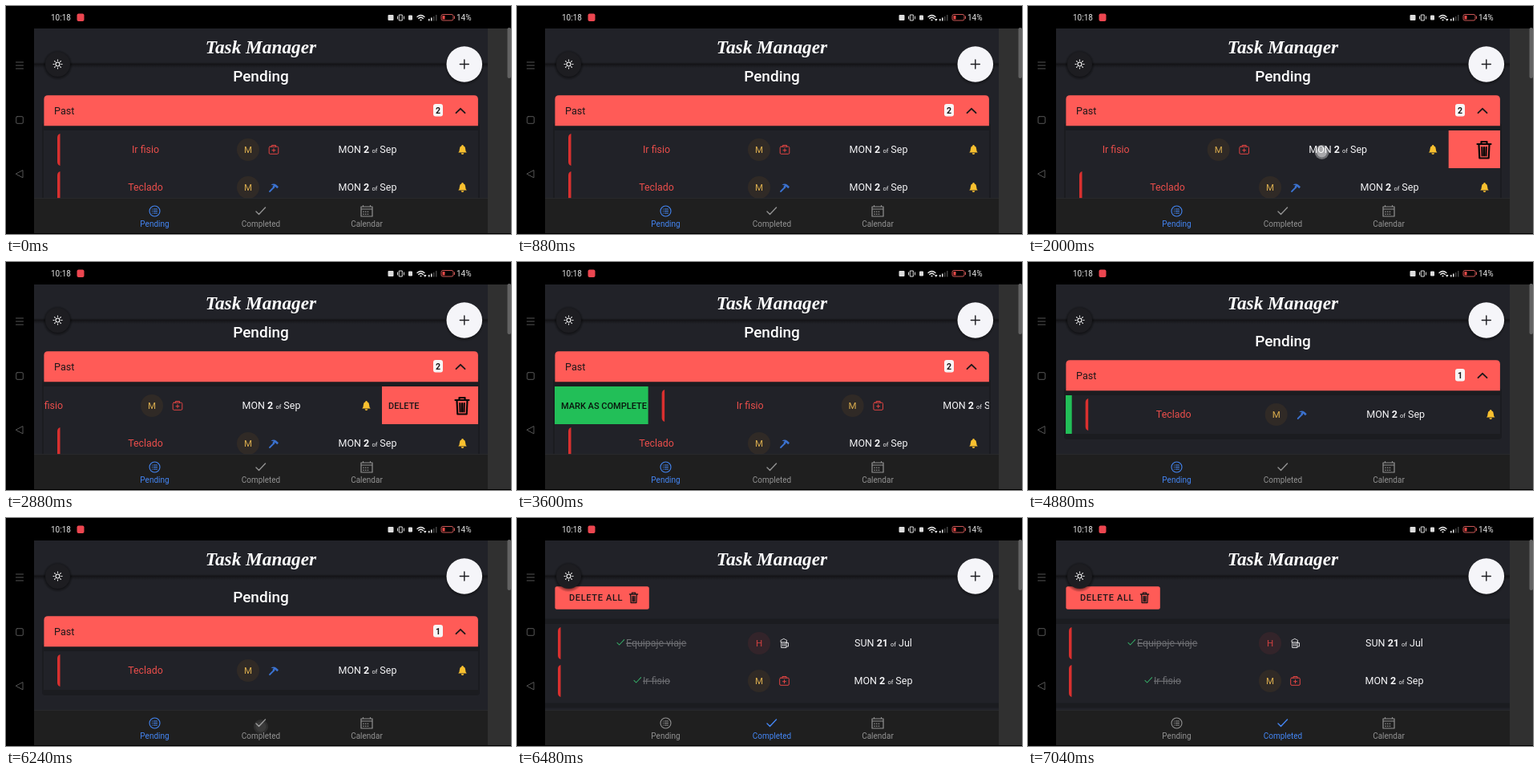
An HTML page for the animation above (8 s loop, 630 px wide and 284 px high).

```html
<!DOCTYPE html>
<html lang="en">
<head>
<meta charset="utf-8">
<title>Task list</title>
<style>
  html, body { margin: 0; height: 100%; overflow: hidden; background: #000; }
  svg { display: block; width: 630px; height: 284px; font: 12.4px Roboto, sans-serif; }
  .line { fill: none; stroke: currentColor; stroke-linecap: round; stroke-linejoin: round; }
  .medium { font-weight: 500; }
  .mid { text-anchor: middle; }
</style>
</head>
<body>
<svg id="stage" viewBox="0 0 630 284"></svg>
<script>
const DURATION = 8000, REMOVE = 4640, SWITCH = 6320;
const RED = '#ff5b57', PAGE = '#212228', GAP = '#1b1c20', INK = '#1c1719';

// Markup helpers
const rect = (x, y, w, h, fill, r = 0) =>
  `<rect x="${x}" y="${y}" width="${w}" height="${h}" rx="${r}" fill="${fill}"/>`;
const circle = (x, y, r, fill, extra = '') =>
  `<circle cx="${x}" cy="${y}" r="${r}" fill="${fill}" ${extra}/>`;
const text = (x, y, str, fill, size = 12.4, cls = '', extra = '') =>
  `<text x="${x}" y="${y}" fill="${fill}" font-size="${size}" class="${cls}" ${extra}>${str}</text>`;
const line = (d, width = 1) => `<path class="line" stroke-width="${width}" d="${d}"/>`;
const at = (x, y, body, color = '#fff', scale = 1) =>
  `<g transform="translate(${x} ${y}) scale(${scale})" color="${color}">${body}</g>`;
const group = (id, body, extra = '') => `<g id="${id}" ${extra}>${body}</g>`;

const icons = {
  medkit: line('M-4.5-3.8h9q1.3 0 1.3 1.3v6.500q0 1.300-1.300 1.300h-9q-1.300 0-1.300-1.300v-6.500q0-1.300 1.300-1.300zM-2.500-3.800v-1.700h5v1.700M-2 .7h4M0-1.300v4', 1),
  hammer: line('M-5 5L.5-.5', 1.8) +
    '<path fill="currentColor" d="M-3.500-3.200Q0-6 3.300-3.200L6-.8 4.300 1.200 1.500-1.300-.3.2-1.700-1.100 0-2.800z"/>',
  beer: line('M-3.800-1.500v7h6.300v-7M2.500-.5h2.500v4.500h-2.500M-1.700 0v3.500M.5 0v3.500', 1) +
    '<path class="line" stroke-width="1" d="M-4.500-1.500q-1-3 1.800-3 2-2.200 4 0 2.800 0 1.800 3z"/>',
  bell: '<path fill="currentColor" d="M-5.300 3.500q1.700-1.500 1.700-4.500 0-3 2.400-3.700a1.200 1.200 0 0 1 2.400 0q2.400.7 2.400 3.700 0 3 1.700 4.500zM-1.800 4.300h3.600a1.800 1.800 0 0 1-3.600 0z"/>',
  trash: line('M-8.500-7.500h17M-3.500-8v-2.500h7v2.500M-6.500-6.500l.8 16.500h11.400l.8-16.500M-2.700-3.500l.3 10.500M0-3.500v10.500M2.700-3.500l-.3 10.500', 2.2),
  check: line('M-6 .5l3.500 3.500 8-8.500', 1.4),
  list: line('M-6.500 0a6.500 6.500 0 1 0 13 0a6.500 6.500 0 1 0-13 0M-1.300-2.500h4.300M-1.300 0h4.300M-1.300 2.500h4.300M-3.200-2.500h.1M-3.200 0h.1M-3.200 2.500h.1', 1.1),
  calendar: line('M-7-5.500h14v12h-14zM-7-2.500h14M-4.500-7v1.500M4.500-7v1.500', 1.2) +
    line('M-4 .8h8M-4 3.800h8', 1.6).replace('<path', '<path stroke-dasharray="0.1 2.600"'),
  sun: line('M-2.500 0a2.500 2.500 0 1 0 5 0a2.500 2.500 0 1 0-5 0M0-5.500v1M0 5.500v-1M-5.500 0h1M5.500 0h-1M-3.900-3.900l.7.7M3.900 3.900l-.7-.7M-3.900 3.900l.7-.7M3.900-3.900l-.7.7', 1.1)
};

const avatar = (letter, y, ink, fill) =>
  circle(302, y, 14, fill) + text(302, y + 4, letter, ink, 11.5, 'mid');
const avatarM = y => avatar('M', y, '#d9ac4e', '#302a26');
const date = (x, y, day, num, month) =>
  text(x, y + 4.3, `${day} <tspan font-weight="700">${num}</tspan> <tspan font-size="7.500">of</tspan> ${month}`,
    '#f4f4f6', 12.5, 'mid');
const redBar = (x, y) =>
  `<path fill="#d9302f" d="M${x + 3.5} ${y - 20}v40q-3.500-1-3.500-5v-30q0-4 3.500-5z"/>`;

const pendingRow = (name, icon, iconColor, y) =>
  rect(47, y - 24, 542, 48, PAGE) + redBar(64, y) +
  text(174, y + 4.3, name, '#ea4e4b', 12.4, 'mid') + avatarM(y) +
  at(334, y, icons[icon], iconColor) + date(451, y, 'MON', 2, 'Sep') +
  at(569.5, y, icons.bell, '#f9c02f');

const doneRow = (name, x, y, badge, icon, iconColor, when) =>
  redBar(51, y) + at(x - 6.5, y - 1, icons.check, '#35a866', .75) +
  text(x, y + 4.3, name, '#6c6d71', 12.4, '', 'text-decoration="line-through"') + badge +
  at(333.5, y, icons[icon], iconColor) + date(457, y, ...when);

const pendingPage = group('pending',
  text(318, 94, 'Pending', '#fff', 19, 'mid medium') +
  group('cardTwo', rect(45, 146, 546, 110, GAP, 3)) +
  group('cardOne', rect(45, 146, 546, 64, GAP, 4)) +
  `<path fill="${RED}" d="M47.400 149.300v-33q0-5 5-5h531.500q5 0 5 5v33z"/>` +
  text(60, 134.5, 'Past', INK, 12.6) +
  rect(533, 122, 12, 15.5, '#f7f5f5', 3) +
  text(539, 133.7, '2', INK, 10.5, 'mid', 'id="count" font-weight="700"') +
  at(567, 130.5, line('M-5.500 2.700L0-2.700 5.500 2.700', 1.8), INK) +
  `<g clip-path="url(#rows)">` +
  rect(47, 155, 200, 48, '#22bf58') + text(55, 183, 'MARK AS COMPLETE', '#09150d', 11, 'medium') +
  rect(389, 155, 200, 48, RED) + text(477, 182.5, 'DELETE', INK, 11, 'medium') +
  at(569, 179.5, icons.trash, '#080808') +
  group('second', pendingRow('Teclado', 'hammer', '#3b72d0', 226)) +
  group('first', pendingRow('Ir fisio', 'medkit', '#e24443', 179)) + '</g>');

const completedPage = group('completed',
  rect(47.4, 85.3, 117.4, 28.4, RED, 2.5) +
  text(65, 103, 'DELETE ALL', INK, 11, 'medium', 'letter-spacing=".66"') +
  at(145.5, 99.5, icons.trash, INK, .6) +
  rect(35, 125.5, 566, 6.5, GAP) + rect(35, 230.5, 566, 6, GAP) +
  doneRow('Equipaje viaje', 136, 156, avatar('H', 156, '#cf403f', '#33242a'), 'beer', '#d8d8da', ['SUN', 21, 'Jul']) +
  doneRow('Ir fisio', 157, 203, avatarM(203), 'medkit', '#e24443', ['MON', 2, 'Sep']));

const tab = (id, x, icon, label) => group(id,
  at(x, 255.5, icons[icon], 'currentColor') + text(x, 274.5, label, 'currentColor', 10, 'mid'));

const statusBar =
  text(56, 18, '10:18', '#e4e4e4', 10) + rect(88.5, 9.5, 9, 9.5, '#ec4650', 2) +
  rect(476.5, 11, 7, 7, '#ddd', 1) +
  at(492.5, 14.5, line('M-1.800-3.500h3.600v7h-3.600zM-4-1.500v3M4-1.500v3', 1), '#ddd') +
  rect(502, 11.5, 5, 6, '#ddd', 1) +
  at(517.5, 18, line('M-4.500-4.500q4.500-4 9 0M-2.800-2.500q2.800-2.500 5.600 0M-.5-.5h1', 1.3), '#eee') +
  group('traffic', '<path fill="#eee" d="M521 16h3.500l-1.700 3z"/>') +
  rect(527, 16, 1.5, 2.5, '#eee') + rect(530, 14.5, 1.5, 4, '#eee') +
  rect(533, 13, 1.5, 5.5, '#444') + rect(536, 11, 1.5, 7.5, '#444') +
  '<rect x="543" y="10.500" width="15" height="7.500" rx="2" fill="none" stroke="#c95655"/>' +
  rect(544.5, 12, 3, 4.5, '#f04a48') + rect(559, 12.5, 1, 3.5, '#c95655') +
  text(562, 18, '14%', '#e4e4e4', 10);

const systemKeys =
  at(17, 74, line('M-4.500-4h9M-4.500 0h9M-4.500 4h9'), '#555') +
  at(17, 142, line('M-3-4.300h6q1.300 0 1.300 1.300v6q0 1.300-1.300 1.300h-6q-1.300 0-1.300-1.300v-6q0-1.300 1.300-1.300z'), '#555') +
  at(17, 209, line('M-4.500 0L4-4.500v9z'), '#555');

const header =
  rect(35, 28, 566, 43, PAGE) + rect(35, 70, 566, 7, 'url(#shade)') +
  text(318, 58.7, 'Task Manager', '#fff', 23.3, 'mid',
    'font-family="Liberation Serif, serif" font-weight="700" font-style="italic"') +
  circle(64.5, 73.5, 19, 'url(#glow)') + circle(64.5, 72.5, 15.5, '#1d1d21') +
  at(64.5, 72.5, icons.sun, '#fff') +
  circle(571.8, 74.5, 25, 'url(#glow)') + circle(571.8, 72.5, 22.3, '#f5f5f9') +
  at(571.8, 72.5, line('M-5.500 0h11M0-5.500v11', 1.4), '#1c1c20');

const $ = id => document.getElementById(id);
$('stage').innerHTML = `<defs>
  <clipPath id="rows"><rect x="47" y="155" width="542" height="95"/></clipPath>
  <clipPath id="rowsOne"><rect x="47" y="155" width="542" height="48"/></clipPath>
  <radialGradient id="glow"><stop offset=".75" stop-opacity=".5"/><stop offset="1" stop-opacity="0"/></radialGradient>
  <linearGradient id="shade" x2="0" y2="1"><stop stop-color="${PAGE}"/><stop offset=".35" stop-color="#141417"/>
  <stop offset="1" stop-color="${PAGE}"/></linearGradient></defs>` +
  rect(0, 0, 630, 284, '#000') + rect(35, 28, 566, 255, PAGE) + rect(601, 28, 29, 255, '#303030') +
  rect(625.5, 27, 4.5, 63, '#626262', 2) + statusBar + systemKeys +
  pendingPage + completedPage + header +
  rect(35, 239.5, 566, 43.5, '#1f1f1f') + rect(35, 239, 566, .8, '#2b2c2f') +
  tab('tabPending', 185.5, 'list', 'Pending') + tab('tabDone', 318, 'check', 'Completed') +
  tab('tabCalendar', 450, 'calendar', 'Calendar') +
  group('touch', circle(0, 0, 9, '#fff', 'opacity=".35"') + circle(0, 0, 6.5, '#fff', 'opacity=".4"'));

// Motion: keys are [time, value, easing towards this key]
function settle(p) {
  let low = 0, high = 1, s = .5;
  for (let i = 0; i < 20; i++) {
    s = (low + high) / 2;
    const x = 1.08 * s * (1 - s) ** 2 + .12 * s * s * (1 - s) + s ** 3;
    if (x < p) low = s; else high = s;
  }
  return 1.98 * s * (1 - s) ** 2 + 3 * s * s * (1 - s) + s ** 3;
}

function track(keys, t) {
  const next = keys.findIndex(key => key[0] > t);
  if (next < 0) return keys[keys.length - 1][1];
  if (next === 0) return keys[0][1];
  const [t0, v0] = keys[next - 1], [t1, v1, ease = p => p] = keys[next];
  return v0 + (v1 - v0) * ease((t - t0) / (t1 - t0));
}

const swipe = [[1800, 0], [2000, -64], [2240, -140], [2740, -120, settle],
  [3000, -120], [3320, 132], [3820, 116, settle], [REMOVE, 116], [REMOVE + 500, 0, settle]];

const touches = [
  { from: 1520, to: 2240, y: 182, x: [[1740, 492], [2000, 367], [2240, 270]] },
  { from: 3000, to: 3320, y: 181, x: [[3000, 270], [3320, 510]] },
  { from: 4400, to: 4560, y: 180, x: [[4400, 110]] },
  { from: 5920, to: 6080, y: 260, x: [[5920, 318]] }
];

const show = (id, visible) => $(id).setAttribute('display', visible ? 'inline' : 'none');
const move = (id, x, y) => $(id).setAttribute('transform', `translate(${x} ${y})`);

function draw(t) {
  const removed = t >= REMOVE, done = t >= SWITCH, dx = track(swipe, t);
  show('pending', !done);
  show('completed', done);
  show('first', !removed);
  show('cardOne', removed);
  show('cardTwo', !removed);
  move('pending', 0, removed ? 11 : 0);
  move('first', dx, 0);
  move('second', removed ? dx : 0, removed ? -47 : 0);
  $('second').parentNode.setAttribute('clip-path', removed ? 'url(#rowsOne)' : 'url(#rows)');
  $('count').textContent = removed ? 1 : 2;
  $('tabPending').setAttribute('color', done ? '#929292' : '#4486f4');
  $('tabDone').setAttribute('color', done ? '#4486f4' : '#929292');
  $('tabCalendar').setAttribute('color', '#929292');
  show('traffic', t >= 880 && t < 7040);

  const touch = touches.find(({ from, to }) => t >= from && t < to + 200);
  show('touch', !!touch);
  if (touch) {
    move('touch', track(touch.x, t), touch.y);
    $('touch').setAttribute('opacity', Math.min(1, 1 - (t - touch.to) / 200));
  }
}

function loop() {
  draw(performance.now() % DURATION);
  requestAnimationFrame(loop);
}
loop();
</script>
</body>
</html>
```
